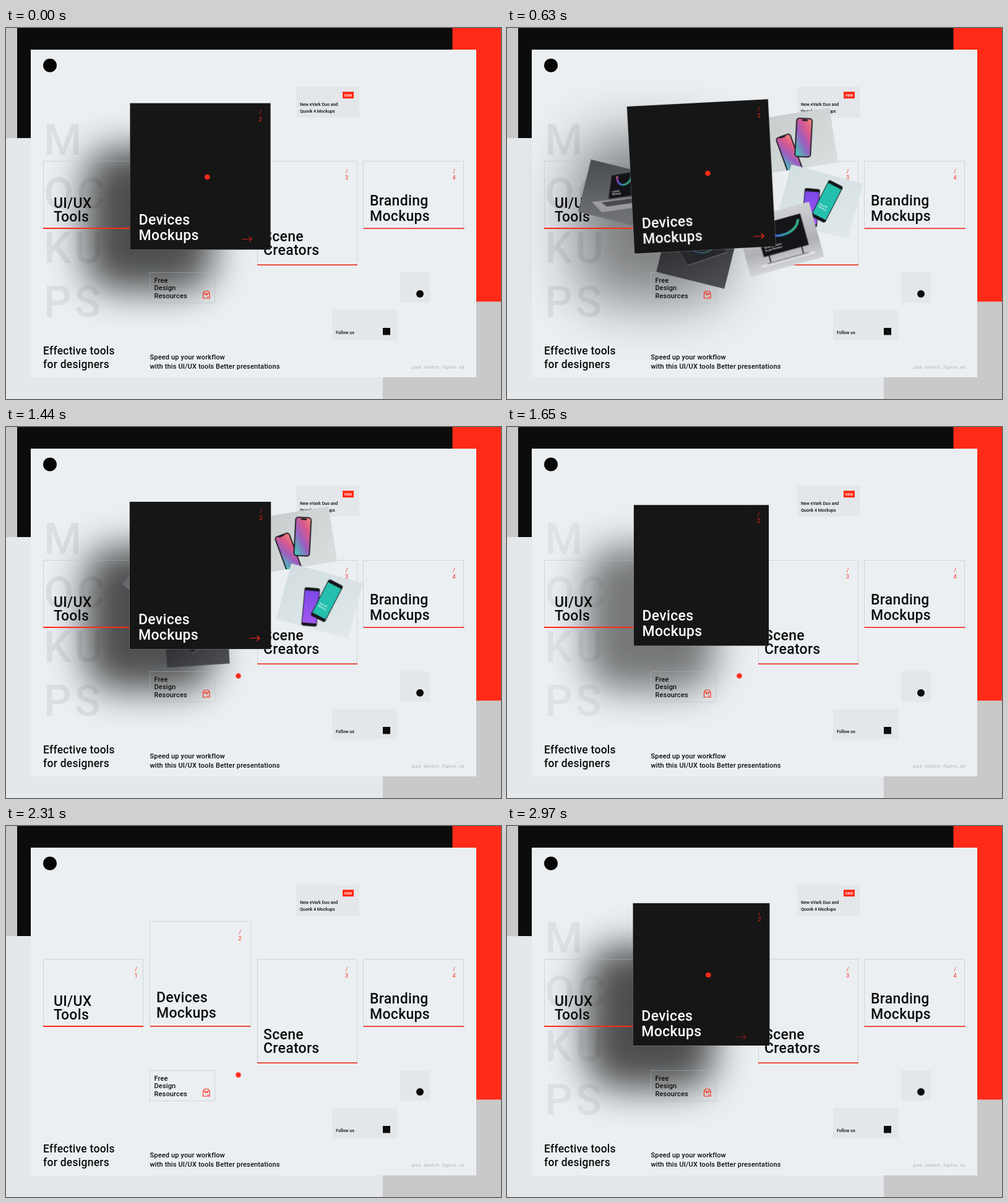
Animation, 800 px wide and 600 px high, one loop 3 s. Source, as an HTML page:

```html
<!DOCTYPE html>
<html lang="en">
<head>
<meta charset="utf-8">
<title>Tools for designers</title>
<style>
@property --p { syntax: "<number>"; inherits: true; initial-value: 0; }
@property --ink { syntax: "<number>"; inherits: true; initial-value: 0; }

html, body { margin: 0; width: 100%; height: 100%; overflow: hidden; background: #e4e8eb; }
svg.stage { display: block; width: 800px; height: 600px; font-family: Roboto, Inter, sans-serif; font-weight: 500; fill: #0c0c0c; }

.box { fill: none; stroke: #b3b9bc; stroke-dasharray: 1 1; vector-effect: non-scaling-stroke; }
.tile { fill: #e3e7ea; }
.rule { stroke: #ff2a17; stroke-width: 2; }
.title { font-size: 23px; letter-spacing: .3px; }
.num { font-size: 9px; font-weight: 400; fill: #ff2a17; text-anchor: middle; }
.tiny { font-size: 7px; }
.note { font-size: 11px; letter-spacing: .15px; }
.photo .cap { font-size: 4px; fill: #fff; }

.shadow, .letters, .photos, .tilt, .card, .arrow, .dot, .photo { animation: 3s linear infinite; }

.shadow { transform-origin: 231px 315px; animation-name: shade; }
@keyframes shade {
  0% { opacity: .68; filter: blur(30px); transform: scale(1); }
  18%, 40% { opacity: .47; filter: blur(40px); transform: scale(1.15); }
  47%, 53% { opacity: .68; filter: blur(30px); transform: scale(1); }
  61%, 92.5% { opacity: 0; filter: blur(30px); transform: scale(1); }
  98.5%, to { opacity: .68; filter: blur(30px); transform: scale(1); }
}

.letters { font-size: 70px; letter-spacing: 5px; fill: rgba(0, 0, 0, .065); animation-name: letters; }
@keyframes letters {
  0%, 53% { opacity: 1; }
  61%, 92.5% { opacity: 0; }
  to { opacity: 1; }
}

/* active card: --p is its growth, --ink its blackness */
.tilt { transform-origin: 314px 239.5px; animation-name: tilt; animation-timing-function: ease-in-out; }
@keyframes tilt {
  0%, 1%, 39%, to { transform: rotate(0deg); }
  18% { transform: rotate(-3.2deg); }
  21% { transform: rotate(-3deg); }
}
.card { animation-name: grow, ink; }
@keyframes grow {
  0% { --p: .98; }
  1%, 52.7% { --p: 1; animation-timing-function: cubic-bezier(.37, 0, .63, 1); }
  61.7%, 91.7% { --p: 0; animation-timing-function: cubic-bezier(.37, 0, .7, .82); }
  to { --p: .98; }
}
@keyframes ink {
  0%, 55.3% { --ink: 1; }
  59.5%, 92.8% { --ink: 0; }
  97.5%, to { --ink: 1; }
}
.frame { transform-origin: 314px 238.25px; transform: scale(calc(1 + .4 * var(--p))); }
.fill { fill: #161616; opacity: var(--ink); }
.label {
  transform: translate(calc(-29px * var(--p)), calc(33.5px * var(--p)));
  --tone: calc(12 + 243 * var(--ink));
  fill: rgb(var(--tone), var(--tone), var(--tone));
}
.count { transform: translate(calc(34px * var(--p)), calc(-35px * var(--p))); }

.arrow { fill: none; stroke: #ff2a17; stroke-width: 1.2; animation-name: arrow; }
@keyframes arrow {
  0% { transform: translateX(-13px); opacity: .75; }
  4%, 53% { transform: none; opacity: 1; }
  55%, 97% { transform: translateX(-34px); opacity: 0; }
  99% { transform: translateX(-24px); opacity: .4; }
  to { transform: translateX(-13px); opacity: .75; }
}

.dot { fill: #ff2a17; animation-name: dot; }
@keyframes dot {
  0% { transform: translate(325.3px, 241px); animation-timing-function: ease-in-out; }
  20%, 29.7% { transform: translate(324.5px, 235px); animation-timing-function: cubic-bezier(.37, 0, .63, 1); }
  45.7%, 85% { transform: translate(375.5px, 402.5px); animation-timing-function: cubic-bezier(.5, 0, .8, .6); }
  93% { transform: translate(331.5px, 275.5px); animation-timing-function: cubic-bezier(.2, .6, .5, 1); }
  98%, to { transform: translate(325.3px, 241px); }
}

/* photos fly out from behind the card and return */
.photos { animation-name: photos; animation-timing-function: step-end; }
@keyframes photos { 0% { opacity: 1; } 55% { opacity: 0; } 99.9% { opacity: 1; } }
.photo {
  --rest: translate(var(--x), var(--y)) rotate(var(--r)) scale(1);
  --from: translate(314px, 240px) rotate(var(--spin)) scale(.95);
  --to: translate(314px, 240px) rotate(var(--back)) scale(.5);
}
.slim    { --x: 469px; --y: 182.5px; --r: -9deg; --spin: -35deg; --back: -40deg; animation-name: slim; }
.teal    { --x: 505.5px; --y: 281px; --r: 15deg; --spin: -20deg; --back: -15deg; animation-name: teal; }
.desktop { --x: 460.5px; --y: 357.5px; --r: -13deg; --spin: -32deg; --back: -40deg; animation-name: desktop; }
.tablet  { --x: 307px; --y: 374px; --r: 15deg; --spin: 2deg; --back: -70deg; animation-name: tablet; }
.laptop  { --x: 163px; --y: 274px; --r: 8.5deg; --spin: 50deg; --back: 65deg; animation-name: laptop; }
.night   { --x: 190px; --y: 372px; --r: -10deg; --spin: 25deg; --back: 30deg; animation-name: night; }
@keyframes slim {
  0%, 1% { transform: var(--from); animation-timing-function: cubic-bezier(.34, 1.4, .64, 1); }
  15%, 48.3% { transform: var(--rest); animation-timing-function: cubic-bezier(.36, 0, .66, -.4); }
  54.5%, to { transform: var(--to); }
}
@keyframes teal {
  0%, 3% { transform: var(--from); animation-timing-function: cubic-bezier(.34, 1.56, .64, 1); }
  18.5%, 47.5% { transform: var(--rest); animation-timing-function: cubic-bezier(.36, 0, .66, -.56); }
  54.5%, to { transform: var(--to); }
}
@keyframes desktop {
  0%, 12.3% { transform: var(--from); animation-timing-function: cubic-bezier(.33, 1, .68, 1); }
  30%, 40.3% { transform: var(--rest); animation-timing-function: cubic-bezier(.32, 0, .67, 0); }
  49.3%, to { transform: var(--to); }
}
@keyframes tablet {
  0%, 11.3% { transform: var(--from); animation-timing-function: cubic-bezier(.33, 1, .68, 1); }
  28.3%, 41% { transform: var(--rest); animation-timing-function: cubic-bezier(.32, 0, .67, 0); }
  52.7%, to { transform: var(--to); }
}
@keyframes laptop {
  0%, 12.3% { transform: var(--from); animation-timing-function: cubic-bezier(.33, 1, .68, 1); }
  30%, 41% { transform: var(--rest); animation-timing-function: cubic-bezier(.32, 0, .67, 0); }
  49.7%, to { transform: var(--to); }
}
@keyframes night {
  0%, 19.7% { transform: var(--from); animation-timing-function: cubic-bezier(.33, 1, .68, 1); }
  36%, 40% { transform: var(--rest); animation-timing-function: cubic-bezier(.32, 0, .67, 0); }
  46.7%, to { transform: var(--to); }
}
</style>
</head>
<body>
<svg class="stage" viewBox="0 0 800 600">
  <defs>
    <linearGradient id="rainbow" x2="1" y2=".4">
      <stop stop-color="#e8964a"/><stop offset=".3" stop-color="#a23fb8"/>
      <stop offset=".6" stop-color="#3f6de0"/><stop offset="1" stop-color="#35b58c"/>
    </linearGradient>
    <linearGradient id="candy" x1="1" x2=".3" y2="1">
      <stop stop-color="#f08a72"/><stop offset=".35" stop-color="#d8588f"/>
      <stop offset=".65" stop-color="#9a5fc0"/><stop offset="1" stop-color="#4fb8bc"/>
    </linearGradient>
    <linearGradient id="violet" y2="1" x2="0"><stop stop-color="#7a48e8"/><stop offset="1" stop-color="#a458f0"/></linearGradient>
    <linearGradient id="mist" x2="1" y2="1"><stop stop-color="#c6cbcc"/><stop offset="1" stop-color="#d9dedf"/></linearGradient>
    <linearGradient id="snow" x2="1" y2="1"><stop stop-color="#d3dee0"/><stop offset="1" stop-color="#e0e8ea"/></linearGradient>
    <linearGradient id="desk" x2="0" y2="1"><stop stop-color="#cfd1d4"/><stop offset=".65" stop-color="#b0b1b6"/><stop offset="1" stop-color="#d4d5d9"/></linearGradient>
    <linearGradient id="slate" x2=".4" y2="1"><stop stop-color="#484b4f"/><stop offset="1" stop-color="#707275"/></linearGradient>
    <linearGradient id="coal" x2="1" y2="1"><stop stop-color="#232427"/><stop offset="1" stop-color="#4f5054"/></linearGradient>
  </defs>

  <path fill="#c9c9c9" d="M0 0h18v178H0zM609 442h191v158H609z"/>
  <path fill="#0c0c0c" d="M18 0H722v178H18z"/>
  <path fill="#ff2a17" d="M721.500 0H800v442.500h-78.500z"/>
  <path fill="#ebeff2" d="M40 35h720v530H40z"/>

  <rect class="shadow" x="128" y="195" width="207" height="230" rx="50" fill="#000"/>
  <g class="letters">
    <text x="61" y="205">M</text><text x="61" y="292">OC</text>
    <text x="61" y="380">KU</text><text x="61" y="467">PS</text>
  </g>

  <circle cx="71" cy="60.500" r="11" fill="#050505"/>

  <g>
    <path class="tile" d="M469 95h102v50H469zM637 395h48v49.500h-48zM527 456h105v49H527z"/>
    <path fill="#ff2a17" d="M544 103h18v11h-18z"/>
    <text x="553" y="110.700" font-size="6.500" fill="#fff" text-anchor="middle">new</text>
    <text class="tiny" x="475" y="126">New eVark Duo and</text>
    <text class="tiny" x="475" y="136.500">Quonk 4 Mockups</text>
    <circle cx="669" cy="430" r="6"/>
    <text class="tiny" x="533" y="495">Follow us</text>
    <path d="M609 485h12v11.500h-12z"/>
  </g>

  <g>
    <rect class="box" x="60.500" y="215.500" width="161" height="108"/>
    <path class="rule" d="M60 324h162M233 324h162M406 383h162M577.500 324h163"/>
    <text class="num" x="210" y="234.500">/<tspan x="210" dy="10.500">1</tspan></text>
    <text class="title" x="77" y="291">UI/UX<tspan x="77" dy="22">Tools</tspan></text>

    <rect class="box" x="406.500" y="215.500" width="161" height="167"/>
    <text class="num" x="550.500" y="234.500">/<tspan x="550.500" dy="10.500">3</tspan></text>
    <text class="title" x="416" y="345">Scene<tspan x="416" dy="22">Creators</tspan></text>

    <rect class="box" x="577.500" y="215.500" width="162" height="108"/>
    <text class="num" x="724" y="234.500">/<tspan x="724" dy="10.500">4</tspan></text>
    <text class="title" x="588" y="287">Branding<tspan x="588" dy="25">Mockups</tspan></text>

    <rect class="box" x="232.500" y="395.500" width="105" height="49"/>
    <text class="note" x="239.500" y="411.500">Free<tspan x="239.500" dy="12.700">Design</tspan><tspan x="239.500" dy="12.700">Resources</tspan></text>
    <path fill="none" stroke="#ff2a17" stroke-width="1.200" d="M318.500 429v8h10.500v-8zM318.500 429l2-3.500h6.500l2 3.500M322 429v2.500h3.500V429M325 435h2.500"/>
  </g>

  <text x="60" y="528" font-size="17.500" letter-spacing=".25">Effective tools<tspan x="60" dy="22">for designers</tspan></text>
  <text class="note" x="232.500" y="535.500">Speed up your workflow<tspan x="232.500" dy="15">with this UI/UX tools Better presentations</tspan></text>
  <text x="741" y="550.500" font-size="8" font-weight="400" letter-spacing=".3" text-anchor="end" fill="#b0b4b7">.psd .sketch .figma .xd</text>

  <g class="photos">
    <g class="photo slim"><svg x="-60" y="-45" width="120" height="90" viewBox="-60 -45 120 90">
      <rect x="-60" y="-45" width="120" height="90" fill="url(#mist)"/>
      <g fill="url(#candy)" stroke="#1b1b20" stroke-width="1.800">
        <rect x="-12" y="-31" width="24" height="62" rx="4" transform="translate(-16 19) rotate(-11)"/>
        <rect x="-12.500" y="-31" width="25" height="62" rx="4" transform="translate(11 -3.500) rotate(12)"/>
      </g>
      <path stroke="#1b1b20" stroke-width="2.500" d="M13 -32l9 2M-27 -9l9 -2"/>
    </svg></g>

    <g class="photo teal"><svg x="-60" y="-46.500" width="120" height="93" viewBox="-60 -46.500 120 93">
      <rect x="-60" y="-46.500" width="120" height="93" fill="url(#snow)"/>
      <g transform="translate(-11.500 13) rotate(-10)">
        <rect x="-12.500" y="-31" width="25" height="62" rx="3.500" fill="#15161a"/>
        <rect x="-11.500" y="-26" width="23" height="52" fill="url(#violet)"/>
      </g>
      <g transform="translate(11 -3.500) rotate(12)">
        <rect x="-13" y="-33" width="26" height="66" rx="3.500" fill="#15161a"/>
        <rect x="-12" y="-27.500" width="24" height="55" fill="#25bfae"/>
        <text class="cap" x="-9" y="10">Smooth<tspan x="-9" dy="4.500">Mockup</tspan></text>
      </g>
    </svg></g>

    <g class="photo desktop"><svg x="-62" y="-46.500" width="124" height="93" viewBox="-62 -46.500 124 93">
      <rect x="-62" y="-46.500" width="124" height="93" fill="url(#desk)"/>
      <path fill="#e0e1e4" d="M-40 33H48l2 4H-42z"/>
      <path stroke="#2b2c30" stroke-width="2" d="M-24 20v13M31 20v13"/>
      <path stroke="#8b8c90" stroke-width="2" d="M-30 33H40"/>
      <rect x="-33" y="-32" width="76" height="53" rx="1" fill="#141518"/>
      <path fill="none" stroke="url(#rainbow)" stroke-width="4" d="M-25 -30C-23 0 30 2 37 -24"/>
      <text class="cap" x="-28" y="8">Desktop Display<tspan x="-28" dy="5">Studio Mockups</tspan></text>
    </svg></g>

    <g class="photo tablet"><svg x="-57" y="-46.500" width="114" height="93" viewBox="-57 -46.500 114 93">
      <rect x="-57" y="-46.500" width="114" height="93" fill="url(#coal)"/>
      <path fill="#26272a" stroke="#505257" d="M-42 -8L18 -42 46 -12 -10 24z" stroke-linejoin="round"/>
      <path fill="none" stroke="url(#rainbow)" stroke-width="1.500" opacity=".7" d="M-18 -9C0 8 24 -3 25 -22"/>
      <path stroke="#77797d" d="M-10 24L46 -12"/>
    </svg></g>

    <g class="photo laptop"><svg x="-60" y="-44" width="120" height="88" viewBox="-60 -44 120 88">
      <rect x="-60" y="-44" width="120" height="88" fill="url(#slate)"/>
      <path fill="#9a9ca0" d="M-42 23L21 -1 39 10 -22 35z"/>
      <path fill="#47484c" d="M-27 20L20 1 28 6 -16 24z"/>
      <path fill="#131417" d="M-21 -27L11 -41 21 -4 -17 11z"/>
      <path fill="none" stroke="url(#rainbow)" stroke-width="3" d="M-12 -28C-10 -9 12 -14 11 -36"/>
      <text class="cap" transform="translate(-14 0) rotate(-22)">Laptop<tspan x="0" dy="4.500">Mockup</tspan></text>
    </svg></g>

    <g class="photo night"><svg x="-63" y="-50.500" width="126" height="101" viewBox="-63 -50.500 126 101">
      <rect x="-63" y="-50.500" width="126" height="101" fill="#111113"/>
      <g transform="translate(3 -11) rotate(-16)" fill="#0a0a0b" stroke="#4a4b4f" stroke-width=".8">
        <rect x="-56" y="-24" width="34" height="68" rx="5"/>
        <rect x="-18" y="-32" width="36" height="70" rx="5"/>
        <rect x="22" y="-20" width="34" height="68" rx="5"/>
        <rect x="-24" y="43" width="36" height="60" rx="5"/>
        <g fill="none" stroke="url(#rainbow)" stroke-width="2">
          <ellipse rx="11" ry="17"/><ellipse cx="1" cy="3" rx="13" ry="10" transform="rotate(35)"/>
        </g>
      </g>
      <text class="cap" x="-57" y="-30">Dark Phone<tspan x="-57" dy="5">Mockup</tspan></text>
      <text class="cap" x="-5" y="11">Screen<tspan x="-5" dy="5">Mockup</tspan></text>
    </svg></g>
  </g>

  <g class="tilt"><g class="card">
    <g class="frame">
      <rect class="box" x="232.500" y="154.500" width="163" height="170"/>
      <rect class="fill" x="232.500" y="154.500" width="163" height="170"/>
    </g>
    <g class="count"><text class="num" x="378" y="174.500">/<tspan x="378" dy="10.500">2</tspan></text></g>
    <g class="label"><text class="title" x="243" y="285">Devices<tspan x="243" dy="25.200">Mockups</tspan></text></g>
    <path class="arrow" d="M393.500 341.500H410M405.500 337l4.500 4.500 -4.500 4.500"/>
  </g></g>

  <circle class="dot" r="4.300"/>
</svg>
</body>
</html>
```
